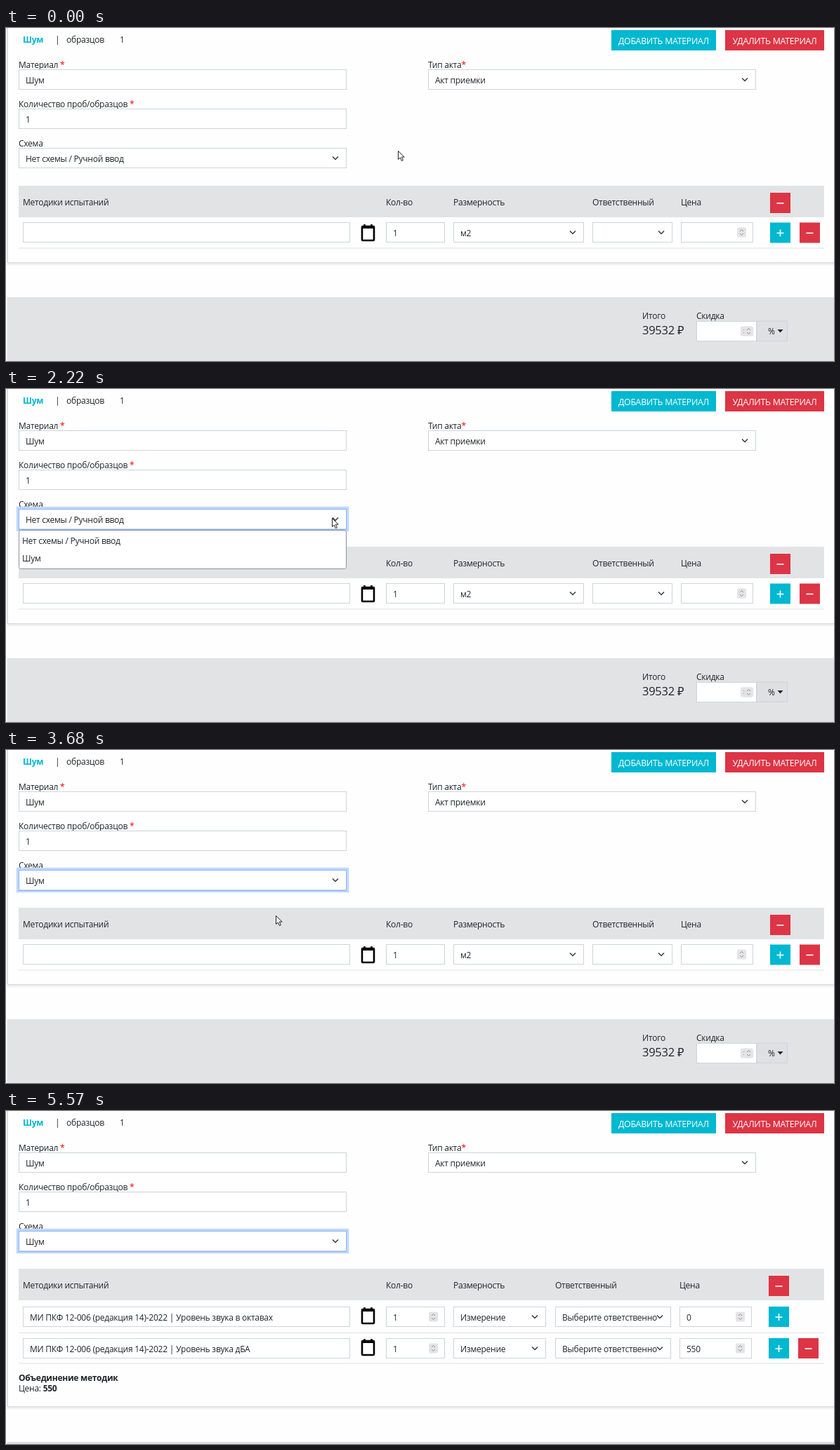
An HTML page for the animation above (7.01 s loop, 1179 by 475 pixels).

```html
<!DOCTYPE html>
<html lang="ru">
<head>
<meta charset="utf-8">
<style>
html, body { margin: 0; width: 100%; height: 100%; overflow: hidden; background: #fefefe; }
svg { display: block; }
text { font: 12px "Open Sans", "Noto Sans", sans-serif; letter-spacing: -.25px; fill: #212529; white-space: pre; }
.b { font-weight: 700; }
.btn { font-size: 12.3px; fill: #fff; text-anchor: middle; }
.sum { font-size: 16.5px; }
</style>
</head>
<body>
<svg id="stage" width="1179" height="475" viewBox="0 0 1179 475"></svg>
<script>
const CYAN = '#00b8d0', RED = '#dc3545', GRAY = '#e2e3e5', BORDER = '#ced4da';
const LOOP = 7010;

const rect = (x, y, w, h, fill, extra = '') =>
  `<rect x="${x}" y="${y}" width="${w}" height="${h}" fill="${fill}" ${extra}/>`;
const text = (x, y, s, cls = '') => `<text x="${x}" y="${y}" class="${cls}">${s}</text>`;
const line = (d, color, width) =>
  `<path d="${d}" fill="none" stroke="${color}" stroke-width="${width}"/>`;
const group = (id, body) => `<g id="${id}">${body}</g>`;
const star = `<tspan fill="#f00">*</tspan>`;

const field = (x, y, w, s = '') =>
  rect(x + .5, y + .5, w - 1, 28, '#fff', `stroke="${BORDER}"`) + text(x + 10, y + 20, s);
const chevron = (x, y) => line(`M${x - 4} ${y - 2}l4 4l4-4`, '#343a40', 1.5);
const select = (x, y, w, s) => field(x, y, w, s) + chevron(x + w - 16, y + 14.5);
const spinner = (x, y) => rect(x, y, 13, 14, '#e4e4e8', 'rx="2"') +
  line(`M${x + 4} ${y + 5.5}l2.5-2.5l2.5 2.5m0 3l-2.5 2.5l-2.5-2.5`, '#8a8a90', 1);
const number = (x, y, w, s) => field(x, y, w, s) + spinner(x + w - 23, y + 7.5);
const sign = (x, y, color, plus) => rect(x, y, 29, 29, color) +
  line(`M${x + 9.5} ${y + 15}h10` + (plus ? 'm-5-5v10' : ''), '#fff', 1.6);
const add = (x, y) => sign(x, y, CYAN, true);
const remove = (x, y) => sign(x, y, RED);
const clipboard = y => rect(507, y + 4, 17, 20, '#fff', 'stroke="#000" stroke-width="2.6" rx="1"') +
  rect(507, y + 3, 17, 4, '#000') + line(`M510.5 ${y + 1}v5m10-5v5`, '#000', 2.6);
const rule = y => rect(18, y, 1147, 1, '#dee2e6');

function header(xs, buttonX) {
  const names = ['Методики испытаний', 'Кол-во', 'Размерность', 'Ответственный', 'Цена'];
  return rect(18, 225, 1147, 45, GRAY) + names.map((s, i) => text(xs[i], 253, s)).join('') +
    remove(buttonX, 235);
}

const card = y => line(`M1 ${y + 2.5}H1179`, '#f1f1f3', 2) +
  line(`M2 0V${y - 2}q0 2 2 2H1179`, '#d6d7da', 1.6);

const footer = y => rect(1.5, y, 1178, 475, GRAY) +
  text(906, y + 31, 'Итого') + text(906, y + 53, '39532 ₽', 'sum') +
  text(983, y + 31, 'Скидка') + number(983, y + 34, 86, '') + spinner(1051, y + 41.5) +
  rect(1069, y + 34, 43.5, 28.5, '#dfe0e2', `stroke="${BORDER}"`) + text(1085, y + 53, '%') +
  `<path d="M1098.5 ${y + 46}h8l-4 4.5z" fill="#212529"/>`;

const total = y => text(18, y, 'Объединение методик', 'b') +
  text(18, y + 15, 'Цена: <tspan class="b" font-weight="700">550</tspan>');

const method = (y, name, price) => field(24, y, 466, 'МИ ПКФ 12-006 (редакция 14)-2022 | ' + name) +
  clipboard(y) + number(541, y, 84, '1') + select(637, y, 132, 'Измерение') +
  select(782, y, 165, 'Выберите ответственно') + number(959, y, 103, price) + add(1086, y);

const form =
  text(24, 21, `<tspan fill="${CYAN}">Шум</tspan>`, 'b') + text(70, 21, '|') +
  text(86, 21, 'образцов') + text(162, 21, '1') +
  rect(862, 3, 149, 29, CYAN) + text(936.5, 23, 'ДОБАВИТЬ МАТЕРИАЛ', 'btn') +
  rect(1024, 3, 141, 29, RED) + text(1094.5, 23, 'УДАЛИТЬ МАТЕРИАЛ', 'btn') +
  text(18, 57, 'Материал ' + star) + field(18, 59, 467, 'Шум') +
  text(601, 57, 'Тип акта' + star) + select(601, 59, 467, 'Акт приемки') +
  text(18, 113, 'Количество проб/образцов ' + star) + field(18, 115, 467, '1') +
  text(18, 169, 'Схема') + select(18, 171, 467, '');

const manual = card(335) + header([24, 541, 637, 835, 961], 1088) +
  field(24, 277, 466) + clipboard(279) + field(541, 277, 84, '1') +
  select(637, 277, 186, 'м2') + select(835, 277, 114, '') + number(961, 277, 103, '') +
  add(1088, 277.5) + remove(1130, 277.5) + rule(313.5) + footer(384);

const empty = card(332) + header([24, 383, 517, 736, 991], 1117) + total(295) + footer(382);

const filled = card(422) + header([24, 541, 637, 782, 959], 1086) +
  method(279, 'Уровень звука в октавах', '0') + rule(316) +
  method(324, 'Уровень звука дБА', '550') + remove(1128, 324) + rule(359.5) +
  total(385) + rect(1.5, 472, 1178, 3, '#dcdde0');

const menu = rect(18.5, 201.5, 466, 55, '#fff', 'stroke="#8f8f9d" rx="3"') +
  rect(19, 230, 465, 23, '#e0e0e6', 'id="hover"') +
  text(23, 221, 'Нет схемы / Ручной ввод') + text(23, 246, 'Шум');

document.getElementById('stage').innerHTML =
  group('manual', manual) + group('empty', empty) + group('filled', filled) + form +
  group('focus', rect(16.5, 169.5, 470, 32, 'none', 'stroke="#c0d7fb" stroke-width="3.5"') +
    rect(18.5, 171.5, 466, 29, 'none', 'stroke="#86b7fe"')) +
  `<text id="scheme" x="28" y="191"></text>` + group('menu', menu) +
  `<path id="cursor" d="M.5 .5V12.5L3.3 9.9L5.4 14.5L7.4 13.6L5.3 9.1H9.2Z"
    fill="#fff" stroke="#222" stroke-width="1"/>`;

const parts = {};
for (const id of ['manual', 'empty', 'filled', 'focus', 'scheme', 'menu', 'hover', 'cursor'])
  parts[id] = document.getElementById(id);
const show = (id, on) => parts[id].style.display = on ? '' : 'none';

// Pointer positions: [time, x, y], each held until the next
const track = [
  [0, 558, 175], [1300, 548, 174], [1400, 531, 171], [1460, 512, 172], [1520, 495, 175],
  [1590, 482, 178], [1650, 474, 181], [1710, 468, 183], [1770, 465, 184], [1830, 464, 184]
];
for (let i = 1; i <= 10; i++) {
  const k = i / 10, ease = k * k * (3 - 2 * k);
  track.push([2220 + 65 * i, Math.round(464 - 80 * ease), Math.round(184 + 52 * ease)]);
}
track.push([5510, 388, 254]);

function draw(now) {
  const t = now % LOOP;
  const [, x, y] = track.filter(p => p[0] <= t).pop();
  show('manual', t < 3800);
  show('empty', t >= 3800 && t < 3860);
  show('filled', t >= 3860);
  show('focus', t >= 2220);
  show('menu', t >= 2220 && t < 3680);
  show('hover', y > 203);
  parts.hover.setAttribute('y', y < 229 ? 206 : 230);
  parts.scheme.textContent = t < 3680 ? 'Нет схемы / Ручной ввод' : 'Шум';
  show('cursor', t < 5570);
  parts.cursor.setAttribute('transform', `translate(${x} ${y})`);
}

const start = performance.now();
function tick() {
  draw(performance.now() - start);
  requestAnimationFrame(tick);
}
tick();
</script>
</body>
</html>
```
